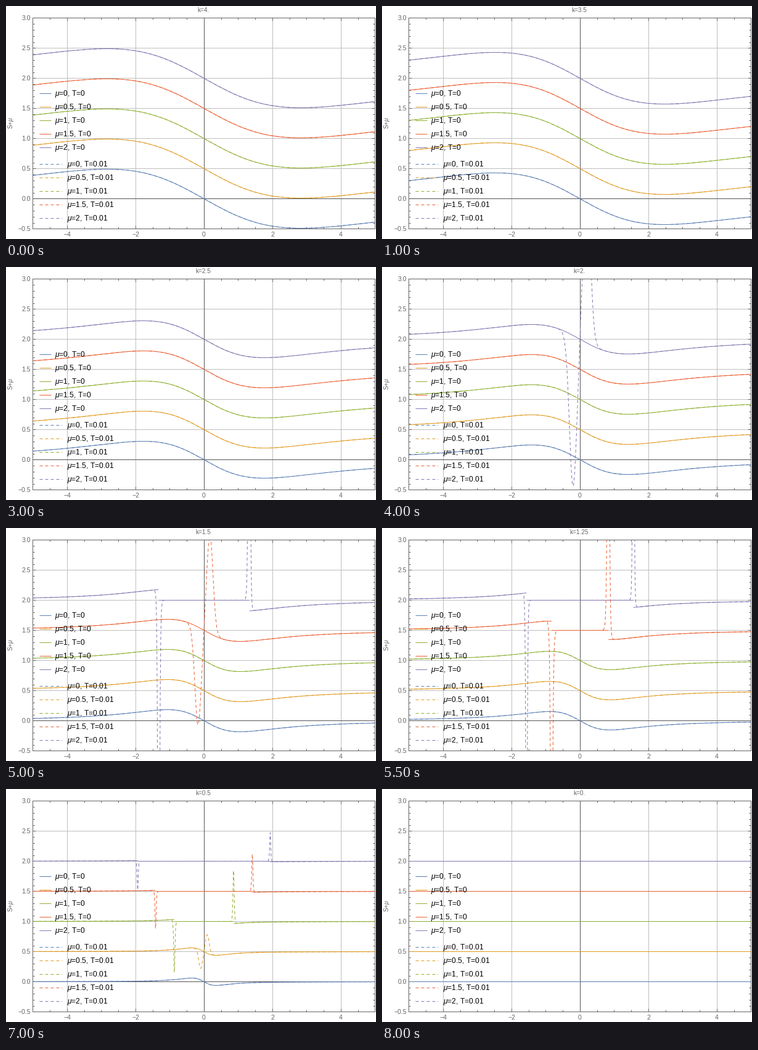
Recreate the animation shown at these times as a matplotlib script. Size 600x379 px, loop 8.5 s.

```python
import numpy as np
import matplotlib as mpl
import matplotlib.pyplot as plt
from matplotlib.animation import FuncAnimation
from matplotlib.ticker import MultipleLocator

W, H, DPI = 600, 379, 100
PX = 72 / DPI  # points per pixel
# Just under half pixels, so that snapping never rounds up a whole pixel
LEFT, RIGHT, TOP, BOTTOM = 43.49, 598.49, 19.49, 362.49
GREY = "#666666"
COLORS = ["#5e81b5", "#e19c24", "#8fb032", "#eb6235", "#8778b3"]
MUS = [0, 0.5, 1, 1.5, 2]
TEMP = 0.01
STEPS, INTERVAL = 17, 500
DASH = (0, (5, 4))

mpl.rcParams.update({
    "font.family": "Liberation Sans",
    "mathtext.fontset": "custom",
    "mathtext.rm": "Liberation Sans",
    "mathtext.it": "Liberation Sans:italic",
    "lines.linewidth": PX,
    "lines.dash_capstyle": "butt",
    "lines.solid_capstyle": "butt",
})

x = np.linspace(-5, 5, 4001)


def energy(k):
    return np.maximum(np.hypot(x, k), 1e-9)


def cold(k, mu):
    """Zero-temperature curve, broken where the energy crosses mu."""
    e = energy(k)
    filled = e >= mu
    y = mu - filled * k**3 * x / (np.pi * e**3)
    y[1:][np.diff(filled.astype(int)) != 0] = np.nan
    return y


def warm(k, mu):
    """Finite-temperature curve with thermal occupation factors."""
    e = energy(k)
    a = np.tanh((e - mu) / (2 * TEMP))
    b = np.tanh((e + mu) / (2 * TEMP))
    occ = (a + b) / 2
    slope = (2 - a**2 - b**2) / (4 * TEMP)
    return mu - k**3 * x / np.pi * (occ / e**3 - slope / e**2)


fig = plt.figure(figsize=(W / DPI, H / DPI), dpi=DPI, facecolor="white")
ax = fig.add_axes([LEFT / W, 1 - BOTTOM / H,
                   (RIGHT - LEFT) / W, (BOTTOM - TOP) / H])
ax.set(xlim=(-5, 5), ylim=(-0.5, 3))
ax.xaxis.set_major_locator(MultipleLocator(2))
ax.xaxis.set_minor_locator(MultipleLocator(0.5))
ax.yaxis.set_major_locator(MultipleLocator(0.5))
ax.yaxis.set_minor_locator(MultipleLocator(0.1))
ax.tick_params(which="both", direction="in", top=True, right=True,
               color=GREY, labelcolor=GREY, labelsize=10.5 * PX, width=PX)
ax.tick_params(which="major", length=5 * PX)
ax.tick_params(which="minor", length=3 * PX)
ax.tick_params(axis="x", pad=5 * PX)
ax.tick_params(axis="y", pad=3.5 * PX)
ax.set_axisbelow(True)
ax.grid(color="#bfbfbf", linewidth=PX)
for spine in ax.spines.values():
    spine.set(color=GREY, linewidth=PX)
ax.axhline(0, color="#555555", zorder=1.5)
ax.axvline(0, color="#555555", zorder=1.5)

cold_lines = [ax.plot([], [], color=c)[0] for c in COLORS]
warm_lines = [ax.plot([], [], color=c, ls=DASH)[0] for c in COLORS]

# Overlay in pixel coordinates for the labels and both legends
over = fig.add_axes([0, 0, 1, 1])
over.set(xlim=(0, W), ylim=(H, 0))
over.axis("off")
title = over.text(320, 9.5, "", color=GREY, size=10 * PX, ha="center")
over.text(8, 190, r"S+$\mu$", color=GREY, size=10 * PX, rotation=90,
          ha="center", va="center")


def legend(top, line_end, text_x, temp, style):
    for i, (mu, color) in enumerate(zip(MUS, COLORS)):
        y = top + 22 * i + 0.4
        over.plot([54, line_end], [y, y], color=color, ls=style)
        over.text(text_x, y + 4, rf"$\mu$={mu:g}, T={temp:g}",
                  color="black", size=12 * PX)


legend(142, 73, 79, 0, "-")
legend(257, 91, 99, TEMP, DASH)


def draw(i):
    k = 4 - 0.25 * i
    title.set_text(f"k={k:g}" + ("." if k == int(k) else ""))
    for mu, solid, dashed in zip(MUS, cold_lines, warm_lines):
        solid.set_data(x, cold(k, mu))
        dashed.set_data(x, warm(k, mu))
    return [title, *cold_lines, *warm_lines]


anim = FuncAnimation(fig, draw, frames=STEPS, interval=INTERVAL,
                     repeat=True, repeat_delay=0)
plt.show()
```
